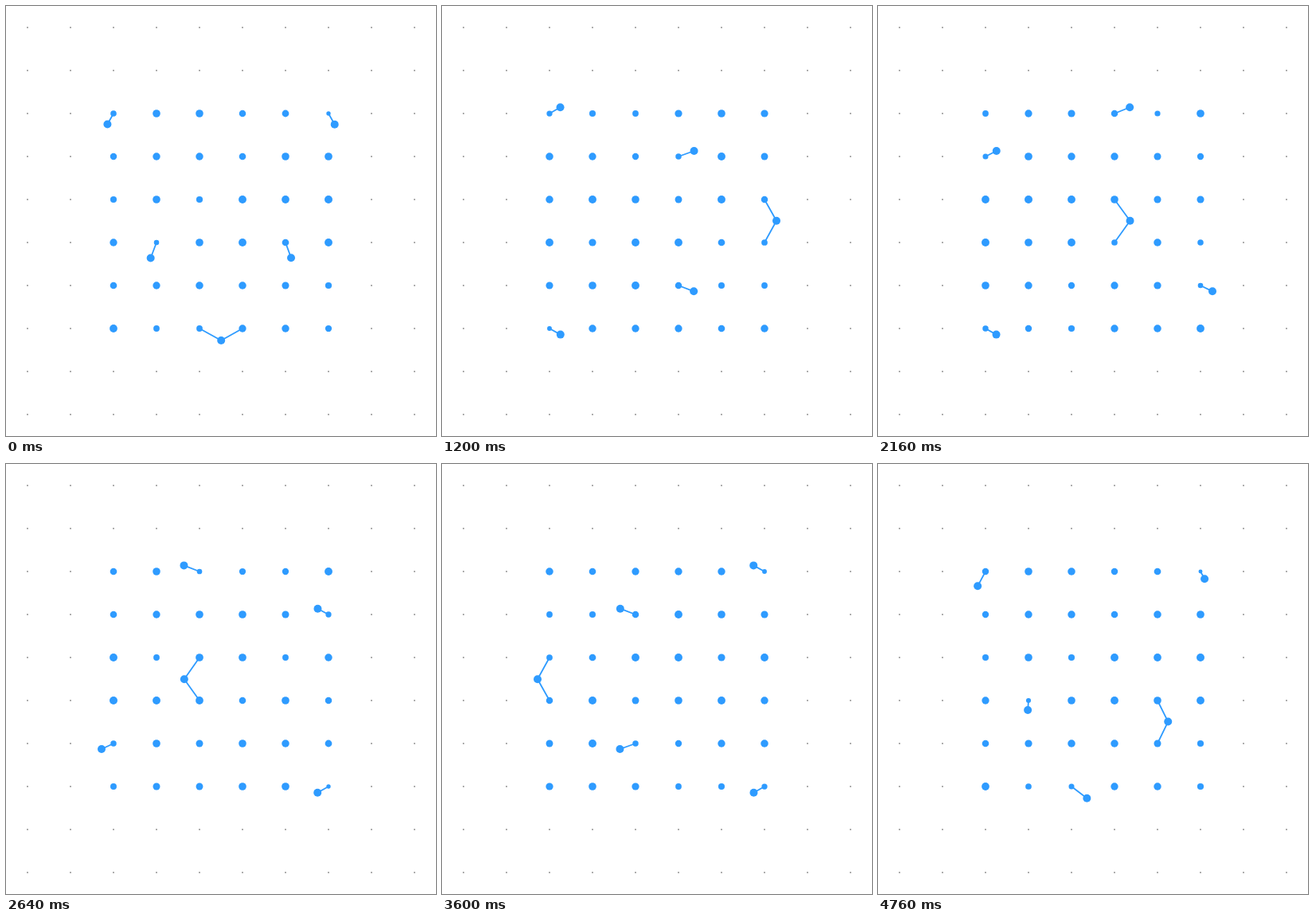
An HTML page with a canvas for the animation above (4800 ms loop, 540 by 540 pixels).

```html
<!DOCTYPE html>
<html lang="en">
<head>
<meta charset="utf-8">
<title>Grid and orbits</title>
<style>
  html, body { margin: 0; width: 100%; height: 100%; overflow: hidden; background: #fff; }
  canvas { display: block; width: 540px; height: 540px; }
</style>
</head>
<body>
<canvas id="stage" width="540" height="540"></canvas>
<script>
const ctx = document.getElementById('stage').getContext('2d');
const LOOP = 4800, STEPS = 120, TAU = Math.PI * 2;
const CELL = 54, MID = 270, ORBIT = 150, REACH = 35, FULL = 5, MOVERS = 5;
const BLUE = '#2e9bff', GREY = '#888';

const grid = (from, to) => {
  const pts = [];
  for (let j = from; j <= to; j++)
    for (let i = from; i <= to; i++) pts.push({ x: (i + 0.5) * CELL, y: (j + 0.5) * CELL });
  return pts;
};
const backdrop = grid(0, 9);
const nodes = grid(2, 7);

// Five ellipses: x and y share a frequency but differ in phase.
const moversAt = turn => Array.from({ length: MOVERS }, (_, i) => ({
  x: MID + ORBIT * Math.sin(TAU * (turn + i / MOVERS)),
  y: MID + ORBIT * Math.cos(TAU * (turn - 2 * i / MOVERS))
}));
const dist = (a, b) => Math.hypot(a.x - b.x, a.y - b.y);

// Nodes shrink towards a distance-based size when linked, and recover slowly.
function buildSizes() {
  const sizes = [];
  let now = nodes.map(() => FULL);
  for (let s = 0; s < STEPS * 2; s++) {
    const movers = moversAt(s / STEPS);
    now = now.map((r, n) => {
      const d = Math.min(...movers.map(m => dist(m, nodes[n])));
      return d < REACH
        ? r + (Math.max(2.1, 1.5 + 0.1 * d) - r) * 0.35
        : r + (FULL - r) * 0.04;
    });
    sizes[s % STEPS] = now;
  }
  return sizes;
}
const sizes = buildSizes();

function dot(p, r, color) {
  ctx.fillStyle = color;
  ctx.beginPath();
  ctx.arc(p.x, p.y, r, 0, TAU);
  ctx.fill();
}

function draw(ms) {
  const turn = (ms % LOOP) / LOOP;
  const pos = turn * STEPS, step = Math.floor(pos) % STEPS, mix = pos - Math.floor(pos);
  const a = sizes[step], b = sizes[(step + 1) % STEPS];
  const movers = moversAt(turn);

  ctx.fillStyle = '#fff';
  ctx.fillRect(0, 0, 540, 540);
  backdrop.forEach(p => dot(p, 0.9, GREY));

  ctx.strokeStyle = BLUE;
  ctx.lineWidth = 1.8;
  ctx.beginPath();
  for (const m of movers)
    for (const n of nodes)
      if (dist(m, n) < REACH) {
        ctx.moveTo(m.x, m.y);
        ctx.lineTo(n.x, n.y);
      }
  ctx.stroke();

  nodes.forEach((p, n) => dot(p, a[n] + (b[n] - a[n]) * mix, BLUE));
  movers.forEach(p => dot(p, FULL, BLUE));
}

const start = performance.now();
function tick() {
  draw(performance.now() - start);
  requestAnimationFrame(tick);
}
tick();
</script>
</body>
</html>
```
